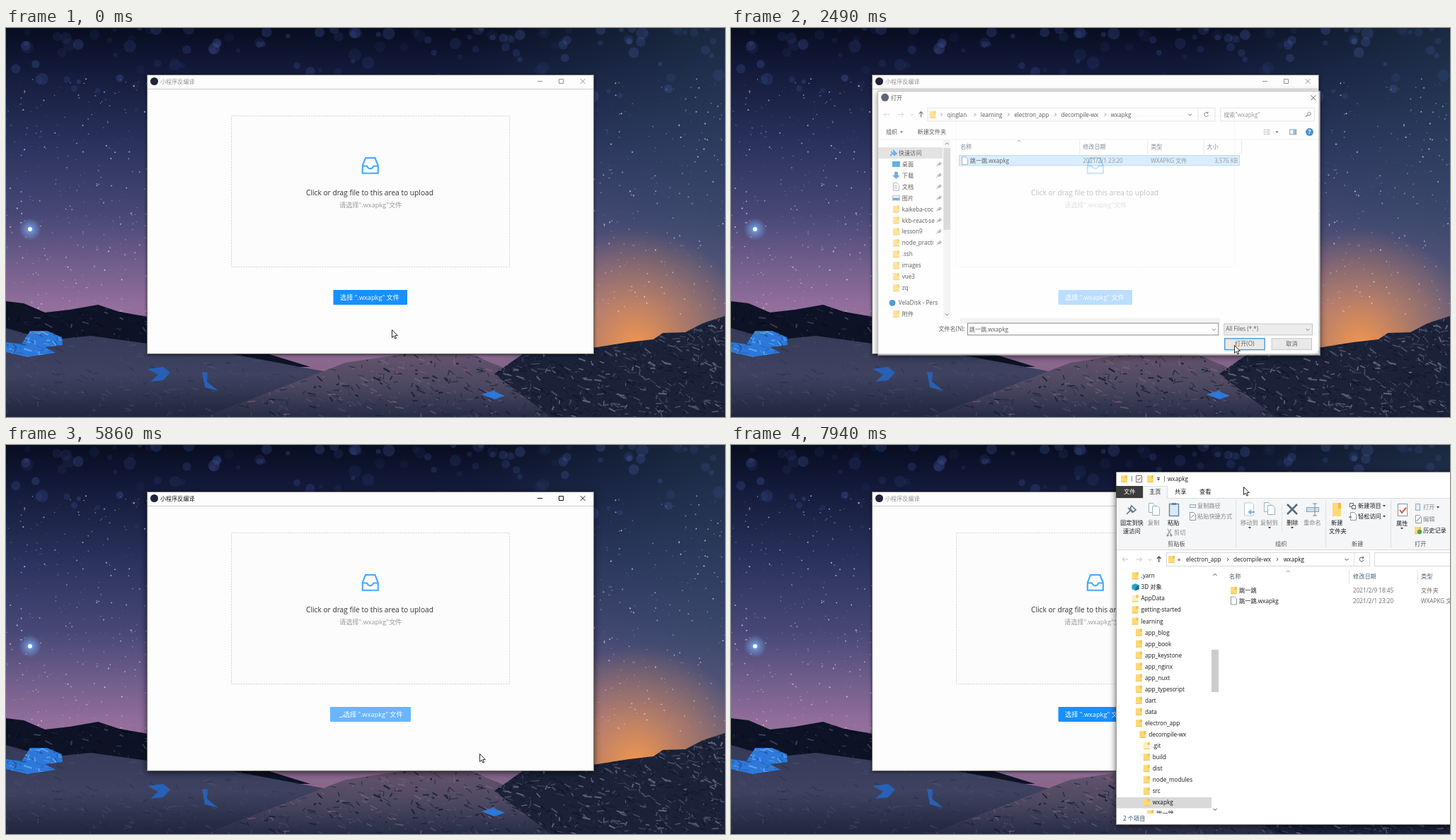
Animation, 1016 px wide and 551 px high, one loop 8 s. Source, as an HTML page with a canvas:

```html
<!DOCTYPE html>
<html lang="zh-CN">
<head>
<meta charset="utf-8">
<title>小程序反编译</title>
<style>
html, body { margin: 0; width: 100%; height: 100%; overflow: hidden; background: #0b1226; }
canvas, svg { position: absolute; left: 0; top: 0; width: 1016px; height: 551px; }
text { font-family: 'Open Sans', 'Noto Sans CJK SC', 'Noto Sans CJK', sans-serif; white-space: pre; }
.shadow { filter: drop-shadow(0 2px 5px rgba(0, 0, 0, .65)); }
</style>
</head>
<body>
<canvas id="sky" width="1016" height="551"></canvas>
<svg id="stage" viewBox="0 0 1016 551">
  <g id="explorer"></g><g id="main"></g><g id="dialog"></g><g id="tip"></g><g id="cursor"></g>
</svg>
<script>
const $ = id => document.getElementById(id);

// ---------- landscape ----------
const ctx = $('sky').getContext('2d');
let seed = 7;
const rand = (a = 1, b = 0) => {
  seed = (seed * 1664525 + 1013904223) >>> 0;
  return b + (a - b) * seed / 4294967296;
};
const fade = (gradient, ...stops) => {
  stops.forEach(([at, color]) => gradient.addColorStop(at, color));
  return gradient;
};
const wash = fill => { ctx.fillStyle = fill; ctx.fillRect(0, 0, 1016, 551); };
const dot = (x, y, r, color) => {
  ctx.fillStyle = color;
  ctx.beginPath(); ctx.arc(x, y, r, 0, 7); ctx.fill();
};
const glow = (x, y, r, rgb, alpha) => wash(fade(ctx.createRadialGradient(x, y, 0, x, y, r),
  [0, `rgba(${rgb},${alpha})`], [.45, `rgba(${rgb},${alpha * .5})`], [1, `rgba(${rgb},0)`]));

function land(points, fill, strokes = [], count = 0) {
  const xs = points.map(p => p[0]), ys = points.map(p => p[1]);
  ctx.save();
  ctx.beginPath();
  points.forEach(p => ctx.lineTo(...p));
  ctx.fillStyle = fill;
  ctx.fill();
  ctx.clip();
  for (let i = 0; i < count; i++) {
    const x = rand(Math.max(...xs), Math.min(...xs)), y = rand(Math.max(...ys), Math.min(...ys));
    ctx.strokeStyle = strokes[i % strokes.length];
    ctx.lineWidth = rand(2.2, .6);
    ctx.beginPath();
    ctx.moveTo(x, y);
    ctx.lineTo(x + rand(12, -4), y + rand(7, -2));
    ctx.stroke();
  }
  ctx.restore();
}

function paintLandscape() {
  wash(fade(ctx.createLinearGradient(0, 0, 0, 551), [0, '#080d20'], [.1, '#121938'], [.28, '#28305a'],
    [.48, '#474876'], [.62, '#75608f'], [.72, '#946f9c'], [1, '#806080']));
  wash(fade(ctx.createLinearGradient(650, 0, 1016, 0), [0, 'rgba(45,70,95,0)'], [1, 'rgba(45,70,95,.5)']));
  glow(890, 450, 165, '240,150,80', 1);
  for (let i = 0; i < 130; i++)
    dot(rand(1016), rand(130) * rand(), rand(9, 3), `rgba(75,100,180,${rand(.28, .06)})`);
  for (let i = 0; i < 1500; i++)
    dot(rand(1016), rand(405, 70), rand(1.1, .3), `rgba(225,230,255,${rand(.8, .15)})`);
  glow(34, 285, 16, '120,180,255', .9);
  dot(34, 285, 3, '#fff');

  land([[0, 387], [25, 390], [55, 403], [90, 399], [130, 392], [160, 402], [200, 409], [430, 480], [0, 480]],
    '#0d1225', ['#171d33', '#39405a', '#080c1a'], 260);
  land([[0, 425], [60, 442], [120, 436], [200, 447], [320, 462], [480, 492], [560, 551], [0, 551]],
    fade(ctx.createLinearGradient(0, 430, 0, 551), [0, '#353b58'], [.5, '#3e4260'], [1, '#20263d']),
    ['#4c4e6b55', '#1c233955', '#5b577455'], 420);
  land([[280, 551], [400, 505], [480, 474], [560, 462], [640, 455], [700, 480], [790, 551]],
    fade(ctx.createLinearGradient(0, 460, 0, 551), [0, '#66546d'], [.5, '#4d4862'], [1, '#262c45']),
    ['#8b6d8477', '#1a2036', '#59587666', '#2b3049'], 620);
  land([[690, 490], [730, 462], [830, 453], [880, 445], [915, 441], [928, 432], [960, 431], [985, 418],
    [1016, 408], [1016, 551], [770, 551]],
    '#1b2238', ['#11172a', '#454b66', '#151b2f', '#626179', '#20283f'], 1000);
  const ice = '#2d78d8';
  land([[0, 445], [22, 448], [34, 429], [58, 429], [79, 438], [80, 449], [55, 452], [70, 460], [30, 466], [0, 459]],
    ice, ['#58a4f0', '#1f58a8'], 60);
  land([[200, 483], [222, 480], [232, 488], [222, 499], [204, 501], [215, 491]], '#2860b5');
  land([[277, 487], [285, 488], [284, 501], [300, 514], [281, 509]], '#2860b5');
  land([[672, 519], [688, 514], [705, 521], [690, 526]], ice);
}

// ---------- drawing helpers ----------
const INK = '#1a1a1a', GREY = '#6d6d6d', BLUE = '#0078d7';
const T = (x, y, s, fill = INK, size = 8.2, extra = '') =>
  `<text x="${x}" y="${y + size * .37}" font-size="${size}" fill="${fill}" ${extra}>${s}</text>`;
const R = (x, y, w, h, fill, extra = '') =>
  `<rect x="${x}" y="${y}" width="${w}" height="${h}" fill="${fill}" ${extra}/>`;
const box = (x, y, w, h, fill, stroke, width = 1) =>
  R(x + .5, y + .5, w - 1, h - 1, fill, `stroke="${stroke}" stroke-width="${width}"`);
const P = (d, stroke = INK, width = 1, fill = 'none') =>
  `<path d="${d}" stroke="${stroke}" stroke-width="${width}" fill="${fill}"/>`;
const C = (x, y, r, fill) => `<circle cx="${x}" cy="${y}" r="${r}" fill="${fill}"/>`;
const V = (x, y1, y2, color = '#e2e2e2') => R(x, y1, 1, y2 - y1, color);
const down = (x, y, c = '#444') => P(`M${x - 2.5} ${y - 1}l2.5 2.5 2.5-2.5`, c);
const up = (x, y, c = '#444') => P(`M${x - 2.5} ${y + 1}l2.5-2.5 2.5 2.5`, c);
const next = (x, y) => P(`M${x - 1} ${y - 2}l2 2-2 2`, '#555');
const caret = (x, y) => P(`M${x - 2} ${y - 1}h4l-2 2.5z`, 'none', 0, '#333');
const cross = (x, y, r, c = INK, w = 1) => P(`M${x - r} ${y - r}l${2 * r} ${2 * r}m0 ${-2 * r}l${-2 * r} ${2 * r}`, c, w);
const folder = (x, y, fill = '#ffd976') =>
  R(x, y - 5, 9, 10, fill) + R(x + 6, y - 5, 3, 4, '#f3c24f') + R(x, y + 4, 9, 1, '#ecc25c');
const page = (x, y, w = 8, h = 11, c = '#8a8a8a') =>
  P(`M${x + .5} ${y - h / 2}h${w - 3}l3 3v${h - 3}h${-w}z`, c, .9, '#fff');
const pin = (x, y) => P(`M${x - 3} ${y + 3}l3-3m-2-1l3 3m-1-4l3 3m-1-4l2 2-3 2z`, '#777', 1);
const refresh = (x, y) => P(`M${x + 2.5} ${y - 2}a3 3 0 1 0 .5 3m-.5-5v2.2h-2.2`, '#555');
const arrows = (x, y, gap) => P(`M${x + 8} ${y}h-8m3-3l-3 3 3 3M${x + gap} ${y}h8m-3-3l3 3-3 3`, '#c2c2c2')
  + down(x + gap * 2, y, '#bbb') + P(`M${x + gap * 2.5 + 3} ${y + 4}v-8m-3 3l3-3 3 3`, '#444', 1.2);

// ---------- windows ----------
function mainWindow() {
  return R(199, 66, 632, 396, '#fdfdfd', 'class="shadow" id="mainShadow"')
    + box(199, 66, 632, 396, '#fdfdfd', '#777') + R(200, 86, 630, 1, '#cfcfcf')
    + C(209.5, 75.5, 5.5, '#20253a')
    + `<g id="titlebar">` + T(218, 76, '小程序反编译', 'currentColor', 8.1)
    + P('M751 75.5h7M781.5 72.5h6v6h-6z', 'currentColor') + cross(815, 75.5, 3.4, 'currentColor') + '</g>'
    + R(318.5, 124.5, 393, 214, '#fcfcfc', 'rx="1" stroke="#d4d4d4" stroke-dasharray="2 1.6"')
    + P('M508 184h13.500l4.300 11v10.800h-22v-10.800zM503.800 195.500h6.200c.5 0 .8 3.800 4.700 3.800s4.200-3.800 4.700-3.800h6.200', '#40a9ff', 2.1)
    + T(424, 233, 'Click or drag file to this area to upload', '#333', 10.2)
    + T(471, 251, '请选择".wxapkg"文件', '#999', 9.2)
    + `<rect id="button" y="371" height="21" rx="1"/>`
    + `<g id="label">${T(472, 381.5, '选择 ".wxapkg" 文件', '#fff', 9.2)}</g>`
    + `<path id="spinner" d="M473 376.600a4.500 4.500 0 0 1 4.500 4.500" stroke="#fff" stroke-width="1" fill="none"/>`;
}

function fileDialog() {
  let s = R(204, 87, 632, 379, '#fff', 'class="shadow"') + box(204, 87, 632, 379, '#fff', '#888', .8)
    + C(214.5, 96.5, 5.5, '#20253a') + T(223, 97, '打开') + cross(826, 97, 3.4)
    + arrows(213, 121, 20)
    + box(275, 111, 411, 20, '#fff', '#d9d9d9') + folder(278, 121) + down(650, 121) + V(661, 111, 131) + refresh(673, 121);
  [['qinglan', 303], ['learning', 351], ['electron_app', 399], ['decompile-wx', 466], ['wxapkg', 537]]
    .forEach(([name, x]) => s += next(x - 8, 121) + T(x, 121, name));
  s += box(693, 111, 135, 20, '#fff', '#d9d9d9') + T(698, 121, '搜索"wxapkg"', GREY)
    + P('M815 124l3-3a2.300 2.300 0 1 1 1 1z', '#555')
    + T(216, 146, '组织') + caret(238, 146) + T(261, 146, '新建文件夹')
    + P('M755 143h3m1 0h5M755 146h3m1 0h5M755 149h3m1 0h5', '#888') + caret(774, 146)
    + box(792, 142, 10, 8, '#fff', '#667') + R(797, 143, 4, 6, '#55a6e8')
    + C(820.5, 146, 5.5, '#0067b8') + T(818.5, 146, '?', '#fff', 8.5, 'font-weight="700"')
    + R(205, 156, 630, 1, '#eee')
    + R(205, 168, 92, 16, '#d9d9d9') + P('M222 180l3-3m-2-3l5 5m-1-6l4 4-3 2z', '#1a86d9', 1.6) + T(234, 176, '快速访问');
  ['桌面', '下载', '文档', '图片', 'kaikeba-coc', 'kkb-react-se', 'lesson9', 'node_practi', '.ssh', 'images', 'vue3', 'zq']
    .forEach((name, i) => {
      const y = 192 + i * 16.1;
      const icons = [
        R(225, y - 4, 11, 8, '#1b8fe6'),
        P(`M228 ${y - 5}h5v5h3l-5.500 5-5.500-5h3z`, 'none', 0, '#2f8ee0'),
        page(226, y) + P(`M228 ${y - 1}h4m-4 3h4`, '#4a90c8'),
        box(225, y - 4, 11, 8, '#e6f3fb', '#9ab') + R(226, y, 9, 3, '#3f86b8')];
      s += (icons[i] || folder(226, y)) + T(239, y, name) + (i < 8 ? R(287, y - 6, 10, 12, '#fff') + pin(291, y) : '');
    });
  s += C(225, 390.5, 4.5, '#0f6fc6') + T(234, 390, 'VelaDisk - Pers') + folder(226, 406.5) + T(239, 406, '附件')
    + R(298, 157, 10, 256, '#f1f1f1') + R(298, 169, 10, 117, '#cdcdcd') + up(303, 163) + down(303, 407)
    + T(322, 166.5, '名称', '#4c607a') + up(406, 159, '#888');
  [[497, '修改日期'], [594, '类型'], [674, '大小']].forEach(([x, name]) => s += V(x - 5, 157, 178) + T(x, 166.5, name, '#4c607a'));
  s += V(723, 157, 178)
    + `<rect id="row" x="320.5" y="179.500" width="400" height="14.500"/>`
    + page(324, 187) + T(336, 187, '跳一跳.wxapkg') + T(497, 187, '2021/2/1 23:20', GREY)
    + T(594, 187, 'WXAPKG 文件', GREY) + T(718, 187, '3,576 KB', GREY, 8.2, 'text-anchor="end"')
    + `<g id="strip">${R(321, 412, 372, 8, '#f0f0f0')}</g>`
    + T(291, 428, '文件名(N):') + `<rect id="field" x="332.5" y="419.500" width="358" height="17" fill="#fff"/>`
    + down(684, 428.5) + `<g id="chosen">${T(335, 428.5, '跳一跳.wxapkg')}</g><g id="textCaret">${V(335, 422, 434, '#000')}</g>`
    + box(698, 420, 127, 17, '#e6e6e6', '#adadad') + T(701, 428, 'All Files (*.*)') + down(818, 428.5)
    + box(699, 441, 58, 17, '#e1e1e1', BLUE, 1.5) + T(714, 449, '打开(O)')
    + box(766, 441, 58, 17, '#e1e1e1', '#adadad') + T(787, 449, '取消')
    + P('M829 464l5-5m-2 5l2-2', '#aaa');
  return s;
}

function explorerWindow() {
  let s = R(544, 38, 524, 500, '#fff', 'class="shadow" id="explorerShadow"') + box(544, 38, 524, 500, '#fff', '#888', .8)
    + folder(551, 48) + V(566, 44, 52, '#888') + box(572, 43, 9, 10, '#fff', '#777') + P('M574 48l2 2 3-4', '#c33')
    + folder(588, 48) + R(602, 46, 4, 1, '#333') + caret(604, 49) + V(612, 44, 52, '#888') + T(617, 48, 'wxapkg')
    + R(545, 75, 523, 73, '#f5f6f7') + R(545, 75, 523, 1, '#dcdcdc') + R(545, 148, 523, 1, '#d8d8d8')
    + R(544, 58, 38, 17, '#3c3c3c') + T(555, 66, '文件', '#fff') + P('M582.500 76v-17.500h34v17.500', '#dcdcdc', 1, '#f5f6f7')
    + T(591, 66, '主页') + T(627, 66, '共享') + T(662, 66, '查看');
  const labels = [[550, 110, '固定到快'], [554, 122, '速访问'], [617, 110, '粘贴'], [785, 110, '删除'], [848, 110, '新建'],
    [845, 122, '文件夹'], [886, 86, '新建项目'], [886, 101, '轻松访问'], [940, 111, '属性'], [978, 121, '历史记录']];
  const dimmed = [[589, 110, '复制'], [659, 86, '复制路径'], [659, 101, '粘贴快捷方式'], [626, 124, '剪切'], [720, 110, '移动到'],
    [748, 110, '复制到'], [809, 110, '重命名'], [978, 88, '打开'], [978, 105, '编辑']];
  const groups = [[617, 140, '剪贴板'], [769, 140, '组织'], [877, 140, '新建'], [966, 140, '打开']];
  labels.forEach(l => s += T(...l));
  dimmed.forEach(l => s += T(...l, '#858585'));
  groups.forEach(l => s += T(...l, '#555'));
  [713, 840, 932, 1016].forEach(x => s += V(x, 78, 146));
  [[733, 117], [761, 117], [793, 117], [923, 86], [923, 101], [948, 118], [999, 88]].forEach(p => s += caret(...p));
  const copy = (x, y) => page(x, y, 9, 13, '#8baac4') + page(x + 5, y + 4, 10, 13, '#8baac4');
  s += V(778, 84, 122) + P('M559 98l6-6m-4-3l7 7m-2-10l6 6-4 3-4-5z', '#687888', 1.7)
    + copy(590, 89) + box(619, 83, 14, 18, '#dce9f5', '#5d84ae', 1.4) + R(623, 82, 6, 3, '#5d84ae')
    + box(648, 84, 9, 5, '#e6edf3', '#8baac4') + page(648, 101) + P('M650 103l4-4', '#5d84ae')
    + P('M617 119l5 8m0-8l-5 8', '#8795a3', 1.2) + C(617, 128, 1.6, '#8795a3') + C(622, 128, 1.6, '#8795a3')
    + page(725, 91, 13, 18, '#b0c6d8') + P('M740 95h-8m3-3l-3 3 3 3', '#7fb0d8', 2)
    + copy(753, 88) + cross(793, 91, 7, '#59697f', 2.6)
    + box(813, 88, 18, 7, '#cfdeeb', '#8ba5bc') + P('M825 83v17m-3-17h6m-6 17h6', '#71879a')
    + R(850, 82, 12, 19, '#ffd976') + R(858, 82, 4, 8, '#efbd45')
    + box(874, 82, 6, 6, '#fff', '#666') + box(877, 85, 6, 6, '#e7eef5', '#666') + page(875, 101) + P('M873 102h4', '#3a83c5', 1.5)
    + box(942, 83, 14, 18, '#fff', '#8493a2') + P('M945 92l3 4 6-7', '#e0562d', 2)
    + box(967, 83, 7, 10, '#e2edf6', '#8baac4') + page(967, 105) + P('M969 108l5-6', '#8baac4', 1.5)
    + folder(966, 121) + C(973, 123, 3.2, '#45a65a')
    + arrows(553, 162, 19.5) + box(615, 152, 288, 20, '#fff', '#d9d9d9') + folder(618, 162)
    + T(631, 162, '«') + T(643, 162, 'electron_app') + next(702, 162) + T(710, 162, 'decompile-wx') + next(772, 162) + T(781, 162, 'wxapkg')
    + down(870, 162) + V(880, 152, 172) + refresh(891, 162) + box(909, 152, 159, 20, '#fff', '#d9d9d9');

  const tree = ['.yarn', '3D 对象', 'AppData', 'getting-started', 'learning', ' app_blog', ' app_book', ' app_keystone', ' app_nginx',
    ' app_nuxt', ' app_typescript', ' dart', ' data', ' electron_app', '  decompile-wx', '   .git', '   build', '   dist',
    '   node_modules', '   src', '   wxapkg', '    跳一跳'];
  s += R(545, 499, 134, 15.5, '#d9d9d9');
  tree.forEach((entry, i) => {
    const name = entry.trimStart(), y = 185.3 + i * 16.05, x = 566.5 + (entry.length - name.length) * 5.4;
    s += (i === 1 ? P(`M${x} ${y - 3}l5-2 5 2v6l-5 2-5-2z`, 'none', 0, '#27a3c9') + P(`M${x + 5} ${y}v5l5-2v-6z`, 'none', 0, '#126f9c')
      : folder(x, y, /^(\.git|AppData)$/.test(name) ? '#fff0bd' : '#ffd976')) + T(x + 13, y, name);
  });
  s += R(545, 522, 523, 15, '#fff') + T(554, 529, '2 个项目', '#24405f')
    + R(679, 290, 10, 60, '#cdcdcd') + up(684, 184) + down(684, 516)
    + T(704, 186, '名称', '#4c607a') + up(787, 179, '#888')
    + V(873, 177, 197) + T(879, 186, '修改日期', '#4c607a') + V(970, 177, 197) + T(975, 186, '类型', '#4c607a')
    + folder(706, 206) + T(718, 206, '跳一跳') + T(879, 206, '2021/2/9 18:45', GREY) + T(975, 206, '文件夹', GREY)
    + page(706, 220.5) + T(718, 220.5, '跳一跳.wxapkg') + T(879, 220.5, '2021/2/1 23:20', GREY) + T(975, 220.5, 'WXAPKG 文件', GREY);
  return s;
}

const tooltip = () => R(431, 401, 167.5, 52, '#000', 'rx="2"') + P('M511 401l4-4 4 4z', 'none', 0, '#000')
  + ['青岚.wxapkg小程序安装包路', "径'/tencent/MicroMsg/xxx/appbrand/", "pkg' (需root权限)"]
    .map((line, i) => T(436, 411.5 + i * 15, line, '#fff', 9.2)).join('');

const pointers = {
  arrow: P('M.5 .5v11l2.600-2.300 1.800 3.900 1.700-.8-1.700-3.700h3.400z', '#111', .9, '#fff'),
  hand: P('M2 7v-6q1-1 2 0v4l4 1q1 0 1 2l-1 5h-5l-3-5q0-1 2-1z', '#111', .9, '#fff'),
  beam: P('M-2-5h1.500l.5.500.5-.5h1.500M0-4.500v9M-2 5h1.500l.5-.500.5.500h1.500', '#111', .9)
};

// ---------- timeline: each entry holds from its time on ----------
const cursorPath = [[0, 545, 427], [270, 514, 405], [390, 476, 381, 'hand'], [540, 482, 382, 'hand'], [660, 500, 376], [780, 528, 364],
  [930, 541, 356], [1080, 520, 318], [1200, 470, 262], [1320, 415, 212], [1440, 385, 190], [1830, 520, 310],
  [1980, 667, 428, 'beam'], [2100, 700, 440], [2220, 722, 448], [2490, 711, 449], [3000, 709, 448], [3120, 701, 446],
  [3240, 691, 443], [3360, 680, 440], [3480, 672, 438], [3600, 669, 437], [6890, 760, 290], [7010, 954, 79],
  [7160, 915, 66], [7280, 860, 52], [7400, 810, 48], [7520, 784, 53], [7670, 779, 58], [7940, 724, 59]];
const dialogShow = [[0, 0, 1], [540, .25, .93], [660, .55, .96], [780, .75, .98], [930, .88, .9905], [1080, 1, 1],
  [2490, .7, .99], [2610, .35, .96], [2730, .1, .93], [2850, 0, 1]];
const explorerShow = [[0, 0, 1], [6130, .04, .91], [6250, .12, .935], [6370, .25, .958], [6490, .7, .985], [6610, 1, 1]];
const tipShow = [[0, 0], [540, .7], [780, .5], [930, .22], [1080, 0]];
const at = (track, t) => track.findLast(entry => entry[0] <= t);
const show = (id, visible) => $(id).setAttribute('opacity', +visible);
const attrs = (id, values) => Object.entries(values).forEach(([k, v]) => $(id).setAttribute(k, v));
const zoom = (id, [, opacity, scale], cx, cy) => attrs(id, {
  opacity, transform: `translate(${cx} ${cy}) scale(${scale}) translate(${-cx} ${-cy})`
});

function render(t) {
  const active = t >= 2730 && t < 7160, loading = t >= 2610 && t < 5980;
  const selected = t >= 1710, raised = t >= 7280;
  $('titlebar').style.color = active ? '#111' : '#929292';
  $('mainShadow').style.filter = active ? '' : 'drop-shadow(0 1px 2px rgba(0,0,0,.6))';
  $('explorerShadow').style.filter = t >= 7670 ? '' : 'none';
  attrs('button', loading ? { x: 458, width: 114, fill: '#69b5ff' } : { x: 462.5, width: 104.5, fill: '#1890ff' });
  attrs('label', { transform: `translate(${loading ? 4.7 : 0} 0)` });
  const angle = (Math.floor((t - 4540) / 120) * 120) * .36 - 5;
  attrs('spinner', { opacity: +loading, transform: `rotate(${angle} 473 381.100)` });

  zoom('dialog', at(dialogShow, t), 520, 276.5);
  attrs('row', selected ? { fill: '#cce8ff', stroke: '#99d1ff' } : { fill: t >= 1590 ? '#e5f3ff' : 'none', stroke: 'none' });
  attrs('field', { stroke: selected ? '#555' : BLUE });
  show('chosen', selected);
  show('strip', selected);
  show('textCaret', !selected);
  show('tip', at(tipShow, t)[1]);

  zoom('explorer', at(explorerShow, t), 806, 288);
  const order = ['main', 'explorer'];
  if (!raised) order.reverse();
  $('stage').insertBefore($(order[0]), $(order[1]));

  const [, x, y, kind = 'arrow'] = at(cursorPath, t);
  attrs('cursor', { transform: `translate(${x} ${y})` });
  if ($('cursor').dataset.kind !== kind) {
    $('cursor').innerHTML = pointers[kind];
    $('cursor').dataset.kind = kind;
  }
}

paintLandscape();
$('main').innerHTML = mainWindow();
$('dialog').innerHTML = fileDialog();
$('explorer').innerHTML = explorerWindow();
$('tip').innerHTML = tooltip();

const start = performance.now();
function tick() {
  render((performance.now() - start) % 8000);
  requestAnimationFrame(tick);
}
tick();
</script>
</body>
</html>
```
